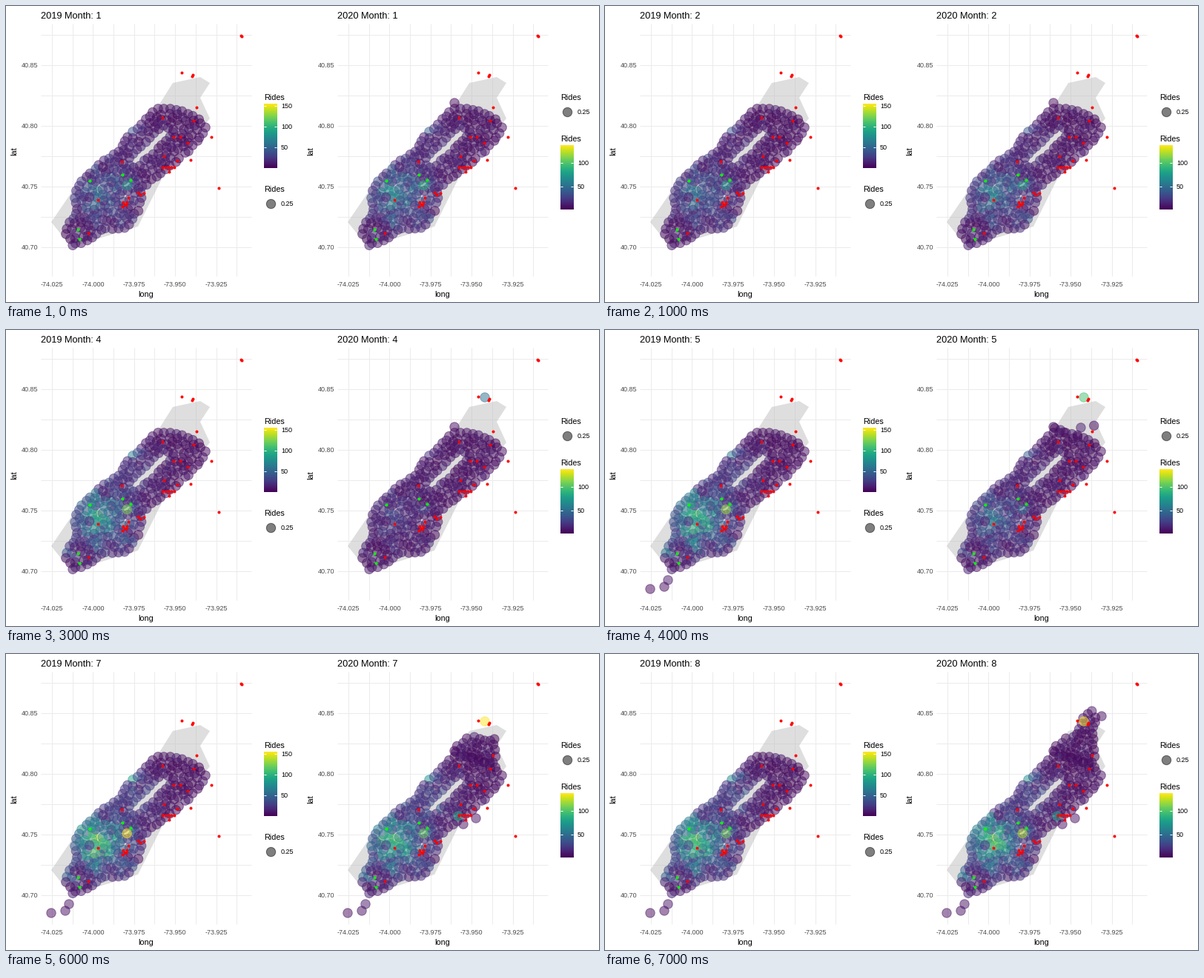
A matplotlib script that plays this animation: 800 px wide and 400 px high, repeating every 8000 ms.

```python
import numpy as np
import matplotlib.pyplot as plt
from matplotlib.animation import FuncAnimation
from matplotlib.path import Path
from matplotlib.patches import Polygon

W, H, DPI = 800, 400, 100
PX = 72 / DPI  # points per pixel
GREY_TEXT = "#4D4D4D"
R = 6.2        # station radius
NEVER = 99
plt.rcParams["font.family"] = "Liberation Sans"

fig = plt.figure(figsize=(W / DPI, H / DPI), dpi=DPI, facecolor="white")
ax = fig.add_axes([0, 0, 1, 1])
ax.axis("off")
viridis = plt.get_cmap("viridis")
rng = np.random.default_rng(11)

# Outlines by their key corners
ISLAND = [(61, 292), (104, 229), (183, 171), (225, 104), (262, 96),
          (275, 104), (262, 124), (275, 152), (213, 228), (178, 298),
          (96, 323), (82, 318)]
COAST = [(90, 322), (80, 307), (82, 299), (97, 276), (92, 262), (98, 244),
         (130, 210), (150, 199), (170, 171), (205, 138), (232, 141),
         (258, 150), (270, 166), (255, 187), (214, 222), (180, 248),
         (181, 267), (165, 298), (127, 303), (103, 321)]
PARK = [(159, 213), (176, 219), (230, 168), (211, 161)]
UPTOWN = [(206, 131), (222, 114), (237, 110), (240, 98), (255, 76),
          (262, 86), (257, 108), (260, 136), (256, 150), (222, 139)]
# Single stations: x, y, opening month in 2019 and in 2020
SINGLES = np.array([(61, 350, 5, 7), (80, 347, 5, 7), (85, 338, 5, 7),
                    (205, 131, NEVER, 1), (246, 91, NEVER, 4),
                    (210, 219, NEVER, 7), (217, 230, NEVER, 7),
                    (234, 222, NEVER, 7), (270, 84, NEVER, 8)])
RED = [(317, 40), (318, 41), (237, 90), (251, 95), (252, 93), (257, 137),
       (277, 177), (287, 246), (249, 208), (253, 155), (211, 151),
       (213, 203), (226, 177), (235, 177), (245, 185), (231, 209),
       (220, 224), (156, 210), (181, 255), (186, 253), (178, 252),
       (165, 259), (124, 262), (111, 307)]
RED += [(x, 218) for x in range(211, 231, 4)]
RED += [(157 + 1.7 * i, 268 + 3 * np.cos(2.4 * i)) for i in range(5)]
GREEN = [(157, 228), (168, 235), (113, 236), (97, 302), (99, 315)]

# Bumps of demand: x, y, height, spread
WORK = [(132, 255, 42, 28), (182, 182, 13, 20), (168, 240, 55, 4)]
PLAY = [(111, 230, 45, 6), (84, 299, 60, 5), (118, 258, 22, 24),
        (172, 185, 12, 20), (138, 262, 25, 6), (210, 219, 80, 2),
        (246, 91, 55, 2)]
TOP = {2019: 151, 2020: 136}


def logistic(t):
    return 1 / (1 + np.exp(-t))


def levels(year, month):
    """Weights of the everyday and the warm-season demand."""
    if year == 2019:
        warm = logistic(1.6 * (month - 3.7))
        return .7 + .4 * warm, warm
    slump = np.exp(-((month - 4) / 1.1) ** 2 / 2)
    return .9 - .72 * slump, logistic(1.3 * (month - 5.4))


def along(poly, step):
    """Points spaced along a closed outline, slightly jittered."""
    p = np.array(poly + poly[:1], float)
    dist = np.r_[0, np.cumsum(np.hypot(*np.diff(p, axis=0).T))]
    t = np.arange(0, dist[-1] - step / 2, step)
    pts = np.c_[np.interp(t, dist, p[:, 0]), np.interp(t, dist, p[:, 1])]
    return pts + rng.normal(0, 1, pts.shape)


def fill(poly, gap, seeds, hole=None):
    """Scatter points inside an outline, none closer than gap."""
    pts = list(seeds)
    tries = rng.uniform(np.min(poly, axis=0), np.max(poly, axis=0), (6000, 2))
    keep = Path(poly).contains_points(tries)
    if hole is not None:
        keep &= ~Path(hole).contains_points(tries)
    for q in tries[keep]:
        if np.min(np.hypot(*(np.array(pts) - q).T)) > gap:
            pts.append(q)
    return rng.permutation(np.array(pts))


def bumps(pts, spec):
    x, y = pts.T
    return sum(h * np.exp(-((x - cx) ** 2 + (y - cy) ** 2) / (2 * s * s))
               for cx, cy, h, s in spec)


city = fill(COAST, 5.8, np.vstack([along(COAST, 8), along(PARK, 8)]), PARK)
uptown = fill(UPTOWN, 6, along(UPTOWN, 8))
north_y = uptown[:, 1]
early = (north_y > 125) & (rng.random(len(uptown)) < .12)
uptown_open = np.where(north_y < 110, 8, np.where(early, 5, 7))

points = np.vstack([city, uptown, SINGLES[:, :2]])
start = {
    2019: np.r_[np.ones(len(city)), np.full(len(uptown), NEVER),
                SINGLES[:, 2]],
    2020: np.r_[np.ones(len(city)), uptown_open, SINGLES[:, 3]],
}
spread = np.exp(rng.normal(0, .4, len(points)))
wobble = np.exp(rng.normal(0, .12, (2, 8, len(points))))
work, play = bumps(points, WORK), bumps(points, PLAY)


def colours(year, month):
    w, p = levels(year, month)
    rides = (6 + w * work + p * play) * spread * wobble[year - 2019, month - 1]
    rgba = viridis(np.clip((rides - 1) / (TOP[year] - 1), 0, 1))
    rgba[:, 3] = .5
    return rgba


def text(x, y, s, size, color="black", ha="left"):
    return ax.text(x, y + .36 * size, s, fontsize=size * PX, color=color,
                   ha=ha, va="baseline", zorder=6)


def line(xs, ys, color, z):
    ax.plot(xs, ys, color=color, lw=PX, zorder=z, solid_capstyle="butt")


def discs(pts, r, **kw):
    pts = np.array(pts, float)
    return ax.scatter(pts[:, 0], pts[:, 1], s=(2 * r * PX) ** 2, **kw)


def size_key(x, y):
    text(x, y, "Rides", 10.8)
    shade = [(0, 0, 0, .5)]
    discs([(x + 8.6, y + 19.5)], R, facecolors=shade, edgecolors=shade,
          linewidths=PX, zorder=5)
    text(x + 23, y + 19.5, "0.25", 9)


def colour_key(x, y, ticks):
    text(x, y, "Rides", 10.8)
    width, top = 17.3, y + 10
    ax.imshow(np.linspace(1, 0, 256)[:, None], cmap=viridis, aspect="auto",
              extent=(x, x + width, top + 5 * width, top), zorder=4,
              interpolation="bilinear")
    for ty, label in ticks:
        for a in (x, x + .8 * width):
            line([a, a + .2 * width], [ty, ty], "white", 5)
        text(x + 23, ty, label, 9)


def panel(ox):
    left, right, top, bottom = ox + 47, ox + 331, 24, 365
    for i in range(10):
        gx = ox + 61.5 + round(27.7 * i)
        line([gx, gx], [top, bottom], "#EBEBEB", 1)
    for i in range(8):
        gy = 38.5 + 41 * i
        line([left, right], [gy, gy], "#EBEBEB", 1)
    for i in range(5):
        text(ox + 62 + 55.4 * i, 376, f"{-74.025 + .025 * i:.3f}", 9,
             GREY_TEXT, "center")
    for i in range(4):
        text(ox + 43, 80 + 82 * i, f"{40.85 - .05 * i:.2f}", 9,
             GREY_TEXT, "right")
    text(ox + 189, 389, "long", 10.8, ha="center")
    ax.text(ox + 11.5, 196, "lat", fontsize=10.8 * PX, rotation=90,
            ha="center", va="center")
    ax.add_patch(Polygon(np.array(ISLAND) + (ox, 0), facecolor="#BEBEBE",
                         alpha=.5, lw=0, zorder=2))
    rides = discs(points + (ox, 0), R, linewidths=PX, zorder=3)
    for spots, color in ((RED, "red"), (GREEN, "lime")):
        discs(np.array(spots) + (ox - .5, -.5), 2, color=color, lw=0, zorder=5)
    return ox, rides, text(left, 12.5, "", 12.8)


panels = {2019: panel(0), 2020: panel(400)}
colour_key(348, 123, [(134.5, "150"), (163, "100"), (191, "50")])
size_key(348, 247.5)
size_key(748, 123)
colour_key(748, 178.9, [(212, "100"), (244, "50")])
ax.set_xlim(0, W)
ax.set_ylim(H, 0)


def draw(i):
    month = i + 1
    for year, (ox, rides, title) in panels.items():
        shown = start[year] <= month
        rgba = colours(year, month)[shown]
        rides.set_offsets(points[shown] + (ox, 0))
        rides.set_facecolor(rgba)
        rides.set_edgecolor(rgba)
        title.set_text(f"{year} Month: {month}")
    return []


anim = FuncAnimation(fig, draw, frames=8, interval=1000, repeat=True,
                     repeat_delay=0, blit=False)
plt.show()
```
